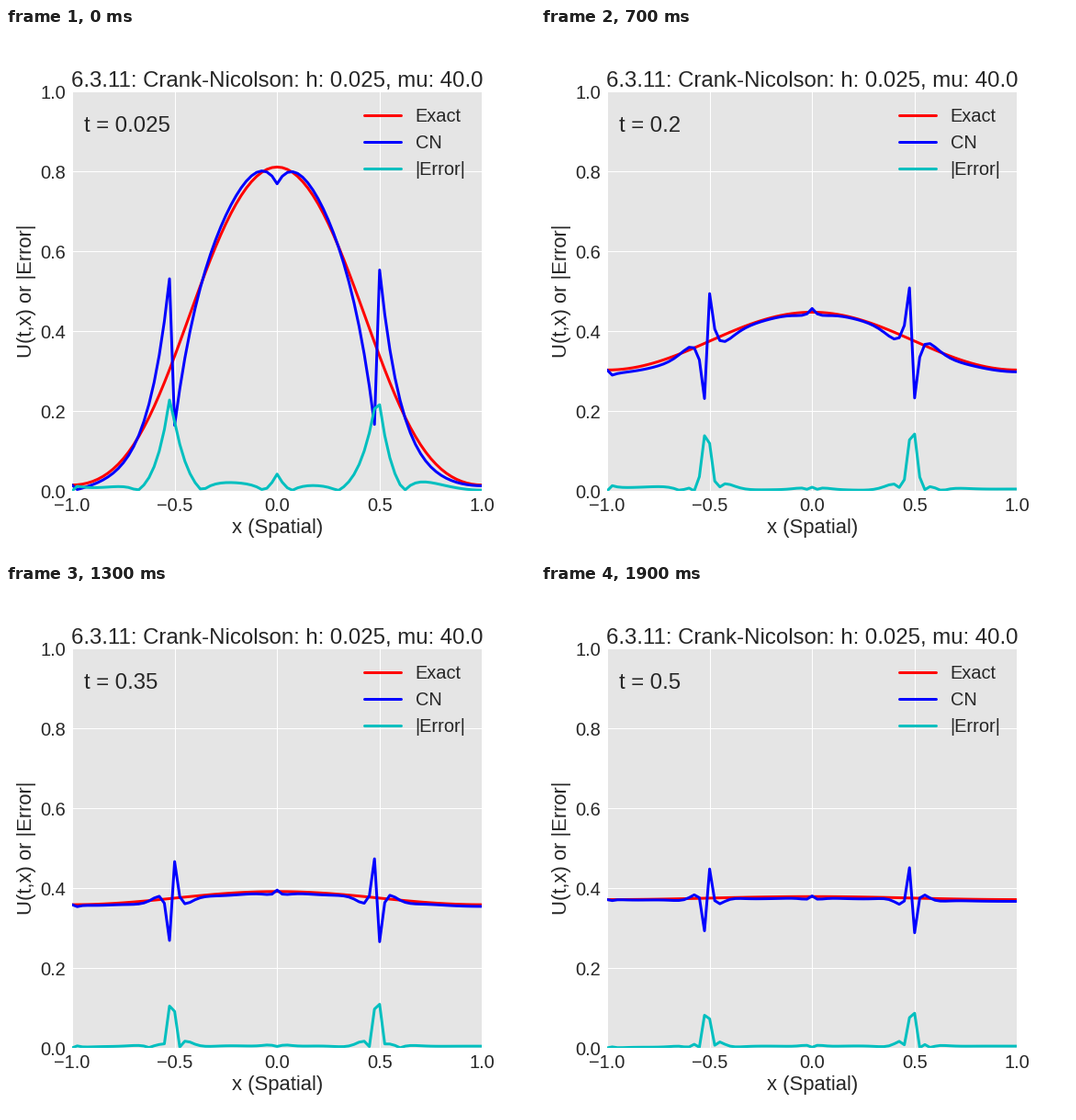
A matplotlib script for the animation above (2000 ms loop, 576x576 px).

```python
import numpy as np
import matplotlib.pyplot as plt
from matplotlib.animation import FuncAnimation

plt.rcParams.update({
    "font.family": "Liberation Sans",
    "text.color": "#262626",
    "axes.labelcolor": "#262626",
    "lines.linewidth": 3,
    "lines.solid_capstyle": "round",
    "axes.unicode_minus": True,
})

H = 0.025            # grid spacing
K = 0.025            # time step
MU = K / H**2
STEPS = 20
M = 80
x = -1 + H * np.arange(M + 1)


def exact(t):
    """Fourier series of the heat equation solution."""
    u = np.full_like(x, 3 / 8)
    for n in range(40):
        k = 2 * n + 1
        a = (-1)**n / (np.pi * k) + 2 / (np.pi * k)**2
        u += a * np.cos(np.pi * k * x) * np.exp(-(np.pi * k)**2 * t)
        u += (np.cos(2 * np.pi * k * x) / (np.pi * k)**2
              * np.exp(-(2 * np.pi * k)**2 * t))
    return u


def crank_nicolson():
    """Left end follows the exact value one step late, right end is insulated."""
    d2 = (np.diag(np.full(M + 1, -2.0)) + np.diag(np.ones(M), 1)
          + np.diag(np.ones(M), -1))
    d2[0] = 0
    d2[M, M - 1] = 2
    eye = np.eye(M + 1)
    lhs, rhs = eye - MU / 2 * d2, eye + MU / 2 * d2

    i = np.arange(M + 1)
    v = np.where((i >= M // 4) & (i < 3 * M // 4), 1 - np.abs(x), 0.0)
    rows = []
    for n in range(1, STEPS + 1):
        v = np.linalg.solve(lhs, rhs @ v)
        v[0] = exact(n * K)[0]
        rows.append(v.copy())
    return rows


true = [exact((n + 1) * K) for n in range(STEPS)]
approx = crank_nicolson()

fig = plt.figure(figsize=(8, 8), dpi=72, facecolor="white")
ax = fig.add_axes([0.125, 0.125, 0.775, 0.755], facecolor="#E5E5E5")
ax.set_axisbelow(True)
ax.grid(True, color="white", linewidth=1, linestyle="-")
for spine in ax.spines.values():
    spine.set_visible(False)
ax.set_xlim(-1, 1)
ax.set_ylim(0, 1)
ax.set_xticks(np.linspace(-1, 1, 5))
ax.set_yticks(np.linspace(0, 1, 6))
ax.tick_params(length=0, pad=7, labelsize=20, labelcolor="#262626")
ax.set_xlabel("x (Spatial)", fontsize=22)
ax.set_ylabel("U(t,x) or |Error|", fontsize=22)
ax.set_title(f"6.3.11: Crank-Nicolson: h: {H}, mu: {MU:.1f}",
             fontsize=24, pad=5)

exact_line, = ax.plot([], [], color="#ff0000", label="Exact")
cn_line, = ax.plot([], [], color="#0000ff", label="CN")
error_line, = ax.plot([], [], color="#00bfbf", label="|Error|")
clock = ax.text(0.03, 0.9, "", transform=ax.transAxes, fontsize=24)
ax.legend(loc="upper right", fontsize=20, frameon=False)


def draw(n):
    exact_line.set_data(x, true[n])
    cn_line.set_data(x, approx[n])
    error_line.set_data(x, np.abs(true[n] - approx[n]))
    clock.set_text(f"t = {(n + 1) * K:.4g}")
    return exact_line, cn_line, error_line, clock


anim = FuncAnimation(fig, draw, frames=STEPS, interval=100, repeat=True,
                     repeat_delay=0, init_func=lambda: draw(0))
plt.show()
```
